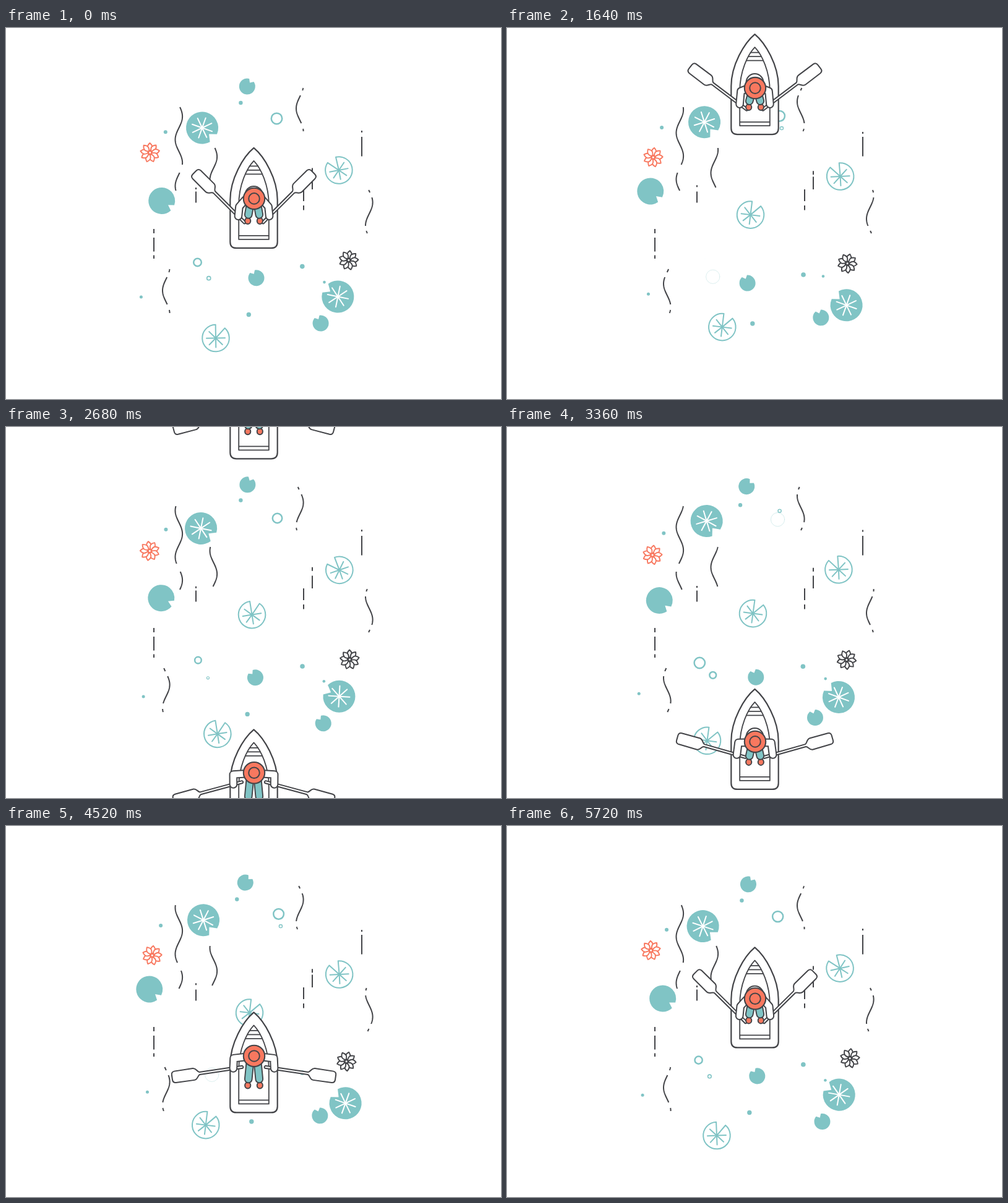
Recreate the animation shown at these times as an HTML page with a canvas. Size 800 px wide and 600 px high, loop 5.76 s.

```html
<!DOCTYPE html>
<html lang="en">
<head>
<meta charset="utf-8">
<title>Rowing boat</title>
<style>
  html, body { margin: 0; width: 100%; height: 100%; overflow: hidden; background: #fff; }
  canvas { display: block; width: 800px; height: 600px; }
</style>
</head>
<body>
<canvas id="stage" width="800" height="600"></canvas>
<script>
const ctx = document.getElementById('stage').getContext('2d');
const LOOP = 5760, STROKE = 1920, DRIFT = 2880;
const TEAL = '#80c4c5', CORAL = '#f8785f', DARK = '#434448', WHITE = '#fff';
const TAU = Math.PI * 2, DEG = Math.PI / 180;
const frac = n => n - Math.floor(n);

// Smooth periodic curve through values at times in [0, 1)
function curve(times, values, u) {
  const n = times.length;
  const T = i => times[(i + n) % n] + Math.floor(i / n);
  const V = i => values[(i + n) % n];
  const slope = i => (V(i + 1) - V(i - 1)) / (T(i + 1) - T(i - 1));
  let i = n - 1;
  while (times[i] > u) i--;
  const h = T(i + 1) - T(i), s = (u - T(i)) / h, s2 = s * s, s3 = s2 * s;
  return V(i) * (2 * s3 - 3 * s2 + 1) + V(i + 1) * (3 * s2 - 2 * s3) +
    h * (slope(i) * (s3 - 2 * s2 + s) + slope(i + 1) * (s3 - s2));
}

function paint(fill, stroke, width = 2) {
  if (fill) { ctx.fillStyle = fill; ctx.fill(); }
  if (stroke) { ctx.strokeStyle = stroke; ctx.lineWidth = width; ctx.stroke(); }
}

function circle(x, y, r, fill, stroke, width) {
  ctx.beginPath();
  ctx.arc(x, y, r, 0, TAU);
  paint(fill, stroke, width);
}

function line(points, color, width) {
  ctx.beginPath();
  points.forEach(([x, y]) => ctx.lineTo(x, y));
  paint(null, color, width);
}

function at(x, y, angle, draw) {
  ctx.save();
  ctx.translate(x, y);
  ctx.rotate(angle * DEG);
  draw();
  ctx.restore();
}

// ---- Water ----

// x, crest at start, then dash ranges
const WAVES = [
  [279.3, 143, [128, 221], [234, 263]],
  [335.3, 133, [194, 258]],
  [474.8, 92.5, [97, 101], [109, 154], [163, 167]],
  [586.8, 282, [262, 266], [274, 320], [328, 332]],
  [258.8, 387, [390, 395], [403, 447], [456, 461]]
];

// x, sway of the short dash, then dash ranges
const STREAKS = [
  [575, -1, [167, 170], [176, 207.5]],
  [495, -2.5, [229, 235], [240.5, 261]],
  [307, 2, [256, 259], [264.5, 282.5]],
  [481, 0, [287, 294.5], [261, 280]],
  [239, 0, [325, 332], [339, 361.5], [367.5, 373]]
];

function water(u, v) {
  for (const [x, crest, ...dashes] of WAVES) {
    for (const [from, to] of dashes) {
      const pts = [];
      for (let y = from; y <= to; y++) {
        pts.push([x + 5.8 * Math.cos(TAU * ((y - crest) / 75 - u)), y]);
      }
      line(pts, DARK, 2);
    }
  }
  for (const [x, sway, ...dashes] of STREAKS) {
    dashes.forEach(([from, to], i) => {
      const dy = i ? 0 : sway * Math.cos(TAU * v);
      line([[x, from + dy], [x, to + dy]], DARK, 2);
    });
  }
}

// ---- Floating things: [centre, cosine, sine] for each axis ----

const DOTS = [
  [3.2, [376, 3.4, -.75], [121, 0, 6]],
  [3, [253.2, 4.6, -2.5], [165.6, 2.6, 5.5]],
  [3.8, [478.8, 0, -.5], [392.2, -6.6, -2]],
  [2.3, [512.9, 1.6, 1.2], [405.7, 5.4, -1.5]],
  [3.7, [396, -3.7, 6], [471, -7.5, -.5]],
  [2.5, [221.9, -3.5, -8], [431.9, 3.2, -2.7]]
];

// birth in the drift cycle, then position
const RINGS = [
  [.56, [314.8, -5.3, -1], [377, 2, 4]],
  [.79, [331.2, -3.5, 3.8], [402.8, 1.9, -2.8]],
  [.985, [440.6, 0, 0], [139.5, -1.5, -3.5]],
  [.39, [440.5, -3, -1.7], [154.4, -8, -.9]]
];

// radius, notch direction, spokes, position
const LEAVES = [
  [26, 43, true, [319.2, -2.2, 5.2], [155, 6.5, -7.2]],
  [26, -145, true, [542, -5.6, -3.7], [441.5, -7, -1.2]],
  [21.5, 34, false, [241.2, 10.5, -.2], [272.5, 7, 5.2]],
  [13, -54, false, [387.8, 2, -1.8], [93.5, 1, 2.5]],
  [13, -120, false, [396.6, 7.9, 2], [408.2, -4, -1.8]],
  [13, -118, false, [505.6, 3, -10.5], [471.6, 6, -5.2]]
];

function leaf(r, spokes) {
  const half = (r > 22 ? 19 : r > 15 ? 14 : 20) * DEG;
  ctx.beginPath();
  ctx.arc(0, 0, r, half, TAU - half);
  ctx.lineTo(r * .57, 0);
  ctx.closePath();
  paint(TEAL);
  if (spokes) for (let i = 0; i < 8; i++) {
    const a = (22.5 + 45 * i) * DEG;
    line([[0, 0], [17 * Math.cos(a), 17 * Math.sin(a)]], WHITE, 2);
  }
}

// Outlined leaf whose open wedge starts straight up
function openLeaf() {
  const wedge = 43 * DEG, up = -90 * DEG;
  ctx.beginPath();
  ctx.moveTo(0, 0);
  ctx.arc(0, 0, 21.8, up + wedge, up + TAU);
  ctx.closePath();
  paint(WHITE, TEAL);
  for (let i = 2; i < 8; i++) {
    const a = up + 45 * i * DEG;
    line([[0, 0], [15 * Math.cos(a), 15 * Math.sin(a)]], TEAL, 2);
  }
}

function flower(color) {
  for (let i = 0; i < 9; i++) at(0, 0, i * 40 - 90, () => {
    ctx.beginPath();
    ctx.moveTo(2.5, 0);
    ctx.bezierCurveTo(7, -5, 11, -5, 15.5, 0);
    ctx.bezierCurveTo(11, 5, 7, 5, 2.5, 0);
    paint(WHITE, color, 1.9);
  });
  circle(0, 0, 2.3, WHITE, color, 1.6);
}

const TURN_TIMES = [0, .25, .403, .569, .736, .93];
const TURNS = [-1, 10, 4, 7, 8, -9];

function pond(t, v) {
  const c = Math.cos(TAU * v), s = Math.sin(TAU * v);
  const pos = ([mid, a, b]) => mid + a * c + b * s;
  const turn = curve(TURN_TIMES, TURNS, v);
  const float = (x, y, angle, draw) => at(pos(x), pos(y), angle + turn, draw);

  for (const [r, x, y] of DOTS) circle(pos(x), pos(y), r, TEAL);

  for (const [birth, x, y] of RINGS) {
    const r = 14.3 * frac(v - birth);
    const width = Math.min(r * .55, 2.5, (11.4 - r) * 1.1);
    if (width > 0) circle(pos(x), pos(y), r, null, TEAL, width);
  }

  for (const [r, notch, spokes, x, y] of LEAVES) float(x, y, notch, () => leaf(r, spokes));

  const w = TAU * t / LOOP;
  const wander = 335.1 + 1.2 * Math.cos(w) + 13.1 * Math.sin(w);
  float([537.8, .1, -2.2], [234.8, -4.8, -2], -53 + 43 - 2, () => {
    ctx.rotate(-43 * DEG);
    openLeaf();
  });
  float([395.8, 2.2, .7], [302.3, .8, -1.3], 0, openLeaf);
  float([wander, 2.7, -6.2], [494.5, 7, 10.7], 0, openLeaf);

  float([234.9, -2.2, 1.5], [206.3, -4.8, 3.5], 0, () => flower(CORAL));
  float([551, 2.9, -4.2], [378.2, -2.6, -.5], 8, () => flower(DARK));
}

// ---- Boat and rower, x measured from the keel, y from the bow ----

const POSE_TIMES = [0, .104, .385, .5, .604, .854];
const POSE = {
  surge: [0, -6, 24.5, 28.5, 28, 13],
  hat: [82, 78, 70, 73, 79.5, 87],
  oar: [45, 42, -13.5, -20, -16, 37],
  gripX: [-14.5, -16, -18.5, -18.5, -18.5, -12.5],
  gripY: [121, 120, 85.5, 87, 91, 122],
  elbowX: [-23.5, -25.5, -33, -33, -33, -22.5],
  elbowY: [95, 88, 73, 74, 78, 92]
};

function mirrored(draw) {
  draw();
  ctx.save();
  ctx.scale(-1, 1);
  draw();
  ctx.restore();
}

function hull() {
  ctx.beginPath();
  ctx.moveTo(0, 0);
  ctx.bezierCurveTo(17, 14, 38.2, 50, 38.2, 84);
  ctx.lineTo(38.2, 152);
  ctx.quadraticCurveTo(38.2, 162, 28.2, 162);
  ctx.lineTo(-28.2, 162);
  ctx.quadraticCurveTo(-38.2, 162, -38.2, 152);
  ctx.lineTo(-38.2, 84);
  ctx.bezierCurveTo(-38.2, 50, -17, 14, 0, 0);
  ctx.closePath();
  paint(WHITE, DARK, 2.2);

  ctx.beginPath();
  ctx.moveTo(0, 21);
  ctx.bezierCurveTo(11.5, 33, 24.3, 60, 24.3, 92);
  ctx.lineTo(24.3, 148);
  ctx.lineTo(-24.3, 148);
  ctx.lineTo(-24.3, 92);
  ctx.bezierCurveTo(-24.3, 60, -11.5, 33, 0, 21);
  ctx.closePath();
  paint(null, DARK, 1.8);

  for (const [y, half] of [[29.5, 7], [36, 10.5], [42.5, 13.5], [142, 24]]) {
    line([[-half, y], [half, y]], DARK, 1.8);
  }
}

function oar(x, y, angle) {
  at(x, y, 180 + angle, () => {
    ctx.beginPath();
    ctx.moveTo(0, -2);
    ctx.lineTo(70, -2);
    ctx.bezierCurveTo(74, -3, 74, -9.5, 80, -9.5);
    ctx.lineTo(110, -9.3);
    ctx.quadraticCurveTo(115, -9, 115, -4);
    ctx.lineTo(115, 4);
    ctx.quadraticCurveTo(115, 9, 110, 9.3);
    ctx.lineTo(80, 9.5);
    ctx.bezierCurveTo(74, 9.5, 74, 3, 70, 2);
    ctx.lineTo(0, 2);
    ctx.quadraticCurveTo(-2.5, 0, 0, -2);
    ctx.closePath();
    paint(WHITE, DARK);
  });
}

function boat(y, p) {
  const a = p.oar * DEG;
  const wrist = [p.gripX - 15 * Math.cos(a), p.gripY - 15 * Math.sin(a)];
  const arm = [[-13.5, p.hat + 1.5], [p.elbowX, p.elbowY], wrist];
  const leg = [[-6.3, p.hat + 12], [-8.8, 108]];
  const back = Math.min(p.hat, 76 + (p.hat - 82) * .4);

  ctx.save();
  ctx.translate(400.5, y);
  hull();
  mirrored(() => {
    oar(p.gripX, p.gripY, p.oar);
    ctx.beginPath();
    ctx.ellipse(-9.8, 118, 4.6, 5, 0, 0, TAU);
    paint(CORAL, DARK);
    line(leg, DARK, 13.6);
    line(leg, TEAL, 9.8);
  });
  mirrored(() => line(arm, DARK, 13.6));
  circle(0, back, 15, DARK);
  mirrored(() => line(arm, WHITE, 9.6));
  circle(0, back, 13, WHITE);
  circle(.5, p.hat, 17.2, CORAL, DARK, 2.1);
  circle(.5, p.hat, 8.8, null, DARK, 2);
  ctx.restore();
}

function render(now) {
  const t = now % LOOP;
  const u = frac(t / STROKE), v = frac(t / DRIFT);
  ctx.fillStyle = WHITE;
  ctx.fillRect(0, 0, 800, 600);
  ctx.lineCap = ctx.lineJoin = 'round';

  ctx.lineCap = 'butt';
  water(u, v);
  ctx.lineCap = 'round';
  pond(t, v);

  const pose = {};
  for (const key in POSE) pose[key] = curve(POSE_TIMES, POSE[key], u);
  const y = 194 - 600 * t / LOOP - pose.surge;
  boat(y, pose);
  boat(y + 600, pose);
}

const start = performance.now();
function tick() {
  render(performance.now() - start);
  requestAnimationFrame(tick);
}
tick();
</script>
</body>
</html>
```
